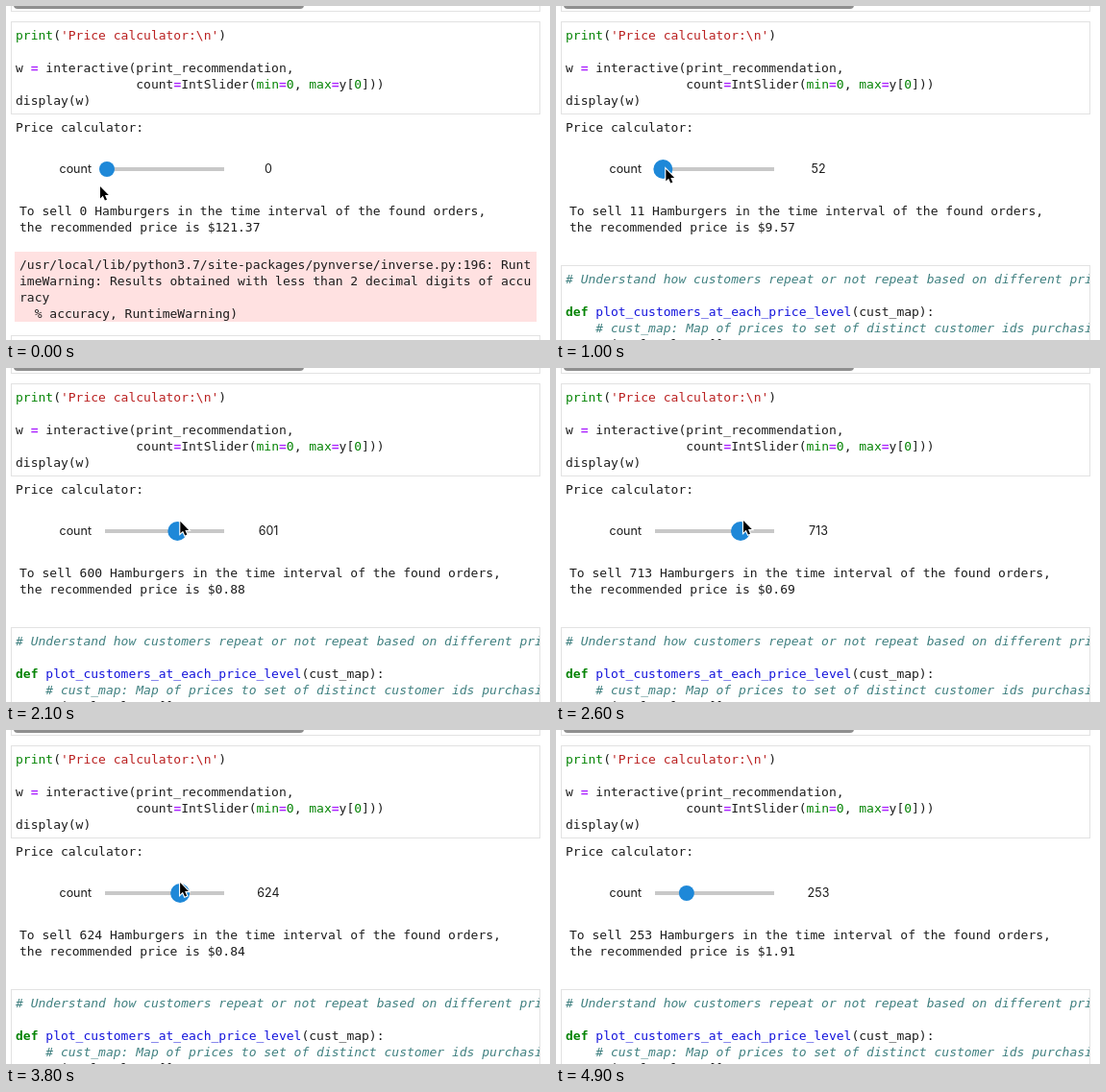
Write an HTML page with a canvas that moves like this. It is 566x348 px and loops after 5.3 s.

```html
<!DOCTYPE html>
<html lang="en">
<head>
<meta charset="utf-8">
<title>Price calculator</title>
<style>
  html, body { margin: 0; width: 100%; height: 100%; overflow: hidden; background: #fff; }
  #stage { position: relative; width: 566px; height: 348px; overflow: hidden; color: #1c1c1c; }
  #stage > * { position: absolute; margin: 0; box-sizing: border-box; }
  pre { font: 13px/17px "DejaVu Sans Mono", "Liberation Mono", monospace; white-space: pre; }
  .cell { left: 5px; width: 551px; border: 1px solid #e2e2e2; padding: 5px 0 0 4px; overflow: hidden; }
  .bar { left: 8px; top: -5px; width: 302px; height: 8px; border-radius: 4px; background: #8f8f8f; }
  .label { font: 12.5px/16px Inter, "Liberation Sans", sans-serif; top: 162px; }
  #warn { left: 9px; top: 256px; width: 543px; height: 73px; padding: 5px 0 0 5px; background: #ffe1e1; }
  canvas { left: 0; top: 0; }
  b, .g { color: #058405; }
  i { color: #408080; }
  .s { color: #ba2121; }
  .o { color: #aa22ff; font-weight: bold; }
  .f { color: #1414dc; }
</style>
</head>
<body>
<div id="stage">
  <div class="cell" style="top:-20px;height:26px"></div>
  <div class="bar"></div>
  <pre class="cell" style="top:16px;height:97px"><span class="g">print</span>(<span class="s">'Price calculator:\n'</span>)

w <span class="o">=</span> interactive(print_recommendation,
                count<span class="o">=</span>IntSlider(<span class="g">min</span><span class="o">=</span><span class="g">0</span>, <span class="g">max</span><span class="o">=</span>y[<span class="g">0</span>]))
display(w)</pre>
  <pre style="left:10px;top:118px">Price calculator:</pre>
  <div class="label" style="left:20px;width:69px;text-align:right">count</div>
  <div class="label" id="readout" style="left:243px;width:60px;text-align:center">0</div>
  <pre id="advice" style="left:14px;top:205px"></pre>
  <pre id="warn">/usr/local/lib/python3.7/site-packages/pynverse/inverse.py:196: Runt
imeWarning: Results obtained with less than 2 decimal digits of accu
racy
  % accuracy, RuntimeWarning)</pre>
  <pre class="cell" id="next" style="height:120px"><i># Understand how customers repeat or not repeat based on different prices</i>

<b>def</b> <span class="f">plot_customers_at_each_price_level</span>(cust_map):
    <i># cust_map: Map of prices to set of distinct customer ids purchasing</i>
    price_levels <span class="o">=</span> []</pre>
  <canvas id="view" width="566" height="348"></canvas>
</div>
<script>
const LOOP = 5300, STEP = 100;
const $ = id => document.getElementById(id);
const ctx = $('view').getContext('2d');
const pointerShape = new Path2D('M0 0V12.4L2.8 9.8L4.9 14.6L7 13.7L5 9.1H8.8Z');

const ramp = (t, from, to) => Math.min(1, Math.max(0, (t - from) / (to - from)));
const easeOut = (k, power) => 1 - (1 - k) ** power;

// drag right, slow down, rest, drag back
const slider = t =>
  374 * ramp(t, 903, 1600) +
  339 * easeOut(ramp(t, 1600, 2600), 1.6) -
  89 * ramp(t, 3300, 3800) ** 2 -
  371 * ramp(t, 3800, 4600);

// the advice trails the slider less and less
const advised = t => slider(t - 76 * Math.exp((1000 - t) / 370));

const knobX = t => 105 + slider(t) * 0.122;

// approach the knob, drift upwards while dragging, leave at the bottom
const pointer = t => ({
  x: knobX(t) - 7 + 8 * ramp(t, 400, 900) + 2 * ramp(t, 900, 1000) - 3 * ramp(t, 3300, 3800),
  y: 188 - 18 * ramp(t, 400, 900) - 11 * easeOut(ramp(t, 1000, 2600), 2.2) + 210 * ramp(t, 4600, 4900)
});

// demand curve: straight between these points on log axes
const CURVE = [[11, 9.57], [253, 1.91], [366, 1.47], [624, 0.84], [713, 0.69]];

function price(n) {
  if (!n) return 121.37;
  const i = Math.max(1, CURVE.findIndex(p => n <= p[0]));
  const [n0, p0] = CURVE[i - 1], [n1, p1] = CURVE[i];
  return p0 * (p1 / p0) ** (Math.log(n / n0) / Math.log(n1 / n0));
}

function drawSlider(x, radius) {
  ctx.fillStyle = '#c8c8c8';
  ctx.fillRect(103, 168, 124, 4);
  ctx.fillStyle = '#1e88d8';
  ctx.beginPath();
  ctx.arc(x, 170, radius, 0, Math.PI * 2);
  ctx.fill();
}

function drawPointer({ x, y }) {
  ctx.save();
  ctx.translate(x, y);
  ctx.lineWidth = 2.2;
  ctx.strokeStyle = '#fff';
  ctx.stroke(pointerShape);
  ctx.fillStyle = '#000';
  ctx.fill(pointerShape);
  ctx.restore();
}

function render(ms) {
  const t = Math.floor(ms % LOOP / STEP) * STEP;
  const count = Math.round(advised(t));
  const early = t < 1000;
  $('readout').textContent = Math.round(slider(t));
  $('advice').textContent =
    `To sell ${count} Hamburgers in the time interval of the found orders,\n` +
    `the recommended price is $${price(count).toFixed(2)}`;
  $('warn').style.display = early ? '' : 'none';
  $('next').style.top = (early ? 343 : 270) + 'px';

  const tip = pointer(t), x = knobX(t);
  const hover = Math.hypot(tip.x - x, tip.y - 170) < 15;
  ctx.clearRect(0, 0, 566, 348);
  drawSlider(x, hover ? 10 : 8);
  drawPointer(tip);
}

const start = performance.now();
function tick() {
  render(performance.now() - start);
  requestAnimationFrame(tick);
}
tick();
</script>
</body>
</html>
```
